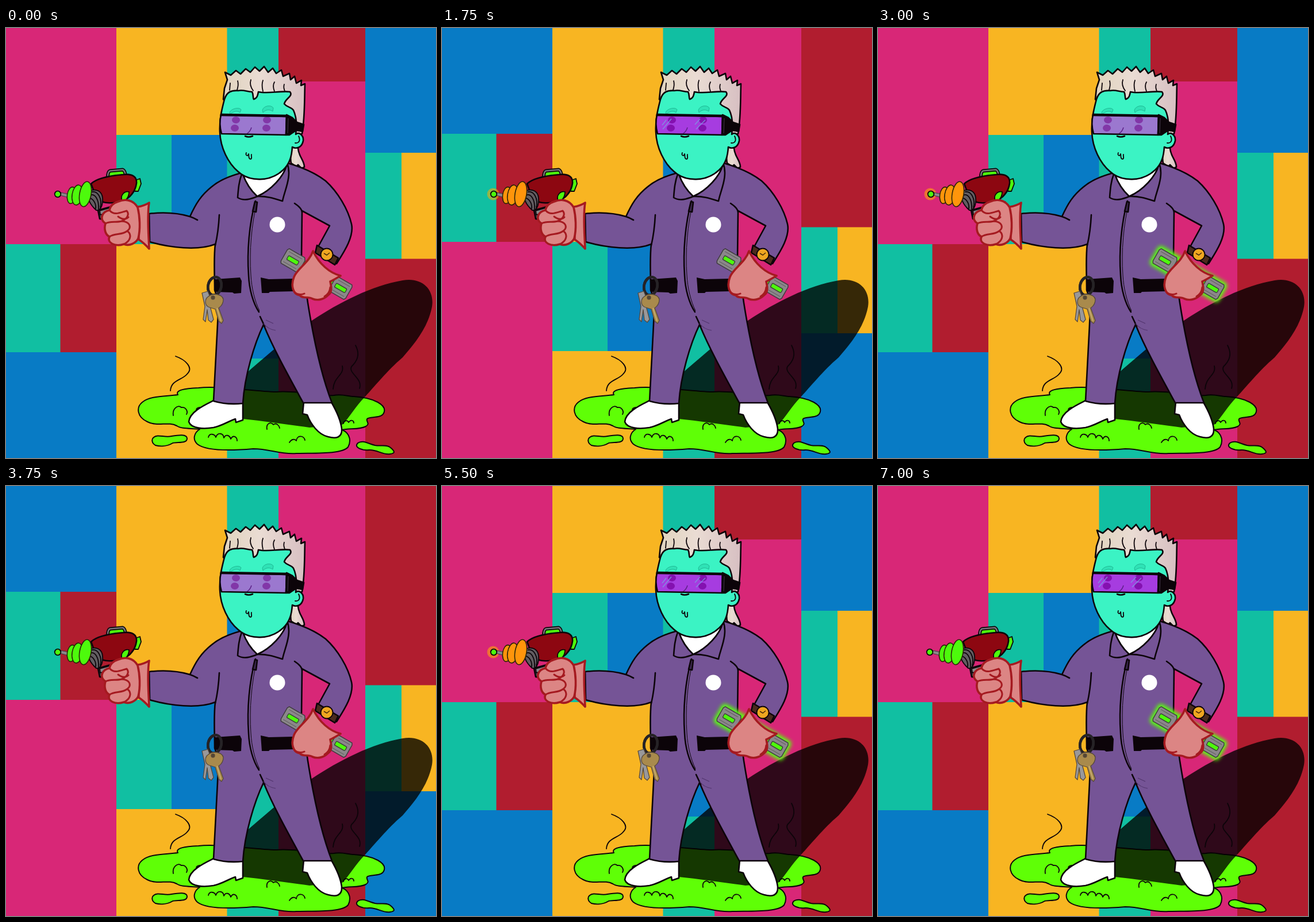
Animation, 748 px wide and 748 px high, one loop 7250 ms. Source, as an HTML page:

```html
<!DOCTYPE html>
<html lang="en">
<head>
<meta charset="utf-8">
<title>Space janitor</title>
<style>
html, body { margin: 0; width: 100%; height: 100%; overflow: hidden; }
svg { display: block; width: 100vw; height: 100vh; }
.ink { stroke: #0c0409; stroke-width: 2.6; stroke-linejoin: round; stroke-linecap: round; }
.line { fill: none; }
.thin { stroke-width: 1.8; }
.slime { fill: #5fff06; stroke-width: 2; }
.suit { fill: #755496; }
.skin { fill: #3bf3c4; }
.hair { fill: url(#hair); }
.glove { fill: #dc8584; stroke: #a51a20; stroke-width: 3.6; stroke-linejoin: round; stroke-linecap: round; }
.fold { fill: none; stroke-width: 3; }
.steel { fill: #8b878a; }
.lime { fill: #4dfa0c; }
</style>
</head>
<body>
<svg viewBox="0 0 748 748" xmlns="http://www.w3.org/2000/svg">
<defs>
  <linearGradient id="hair">
    <stop offset="0" stop-color="#e0d4be"/>
    <stop offset=".45" stop-color="#eadcd3"/>
    <stop offset="1" stop-color="#d7bfc2"/>
  </linearGradient>
  <filter id="blur" x="-30%" y="-60%" width="160%" height="220%"><feGaussianBlur stdDeviation="3"/></filter>
</defs>

<g id="tiles"></g>

<g id="puddle">
  <path class="ink slime" d="M299 638C294 630 310 627 335 626C370 622 430 632 470 633C510 630 540 641 570 639C585 636 595 641 605 641C640 643 664 656 657 670C652 680 632 675 628 680C626 685 634 688 626 693C615 699 596 696 585 699C600 706 600 720 595 729C584 742 535 739 505 740C475 742 460 732 430 732C395 735 350 737 333 724C324 716 327 704 337 698C322 696 306 698 297 692C282 684 264 694 246 685C228 677 226 660 237 651C250 640 275 641 299 638Z"/>
  <path class="ink slime" d="M257 712C264 706 276 713 288 710C300 708 315 706 315 714C315 723 300 720 290 722C280 728 268 728 260 726C253 722 253 715 257 712Z"/>
  <path class="ink slime" d="M612 722C620 716 630 723 642 726C652 728 662 724 669 730C676 736 678 740 668 741C655 743 645 733 632 734C620 735 604 730 612 722Z"/>
  <path class="ink line thin" d="M291 674C289 662 299 655 305 660C313 659 317 667 314 672M331 664C332 660 338 659 344 661M352 712C354 704 363 706 365 712C368 703 378 704 379 713C382 706 389 708 391 715C395 707 402 711 402 718M454 698C452 688 461 684 465 690C470 686 475 691 476 696M493 721C497 714 503 715 505 718C506 708 518 708 520 717M587 688C588 682 594 682 596 686C600 680 605 683 605 687"/>
</g>

<path id="shadow" fill="#000" opacity=".78" d="M412 680L414 604C455 568 492 536 532 509C580 477 637 448 690 439C724 433 746 455 741 485C734 522 709 551 690 573C663 596 640 625 625 641C608 658 598 677 585 690L528 695C490 690 452 684 412 680Z"/>

<path class="ink line thin" d="M295 571C312 577 327 591 315 602C306 613 287 612 286 631M608 552C617 569 610 580 601 589C595 601 621 609 615 627M585 588C589 604 570 606 569 628"/>

<g id="shoes" class="ink" fill="#fff">
  <path d="M361 648C345 656 319 668 318 685C322 697 344 698 361 695C376 692 387 684 399 680L400 686L412 682L412 652Z"/>
  <path d="M518 650L516 671L524 673C530 689 543 707 560 711C574 715 585 713 584 697C582 682 573 663 566 651Z"/>
</g>

<path class="ink hair" d="M493 199C499 210 493 223 496 235L505 241L508 238L514 244L519 242C519 230 509 224 508 209Z"/>

<g id="suit">
  <path class="ink suit" d="M410 252C390 257 370 266 358 276C339 291 330 306 320 328C300 322 275 320 249 323L250 372C284 382 334 388 364 376C361 400 363 428 363 456C371 476 369 493 368 515C366 560 363 605 361 649Q385 656 412 653C415 605 432 549 448 516C466 560 493 608 517 652L567 652C547 601 535 541 525 478L514 400L515 318L563 344L540 386L575 410C587 391 606 363 601 341C595 315 577 285 556 266C538 252 514 242 490 235Z"/>
  <path class="ink line" d="M371 325C370 345 368 361 364 378M515 320C514 314 508 309 502 305M320 328Q326 330 333 334M442 502L450 519"/>
  <path class="line" stroke="#53366f" stroke-width="1.2" d="M448 514C454 522 462 525 469 526M452 508L465 514"/>
  <path d="M364 437L407 434L410 440L409 461L397 462L394 460L363 459ZM443 434L457 437L500 436L501 458L459 459L457 461L445 461Z" fill="#0c0409"/>
  <path class="ink line" stroke-width="2" d="M434 301C423 340 419 389 422 430C423 455 430 479 440 494"/>
  <path class="line" stroke="#0c0409" d="M437 302C427 340 423 389 426 430C427 452 433 476 441 492"/>
  <path class="ink" fill="#fff" d="M411 252C416 267 425 282 437 293C460 283 485 258 489 235Z"/>
  <path class="ink suit" d="M411 252C405 266 404 281 403 295C414 302 427 297 437 293C425 282 416 267 411 252ZM489 235C485 258 460 283 437 293C454 292 468 297 481 301C484 284 498 258 489 235Z"/>
  <path class="ink" fill="#39264b" d="M433 302L429 319L435 320L437 303Z"/>
  <circle cx="472" cy="342" r="13.5" fill="#fff"/>
</g>

<g id="head">
  <path class="ink hair" d="M378 124L380 105L385 90L381 77L391 82L400 74L408 80L417 71L425 77L433 68L441 75L449 67L456 77L464 70L470 79L479 73L482 84L493 79L495 90L502 84L505 96L514 91L513 100L520 97C519 130 520 155 515 184L492 190L390 140Z"/>
  <path class="ink skin" d="M380 124C384 111 392 108 404 109C413 107 420 111 428 111C431 116 429 122 431 124C437 122 438 117 439 111C454 115 476 109 494 111C500 119 486 122 484 132C490 139 496 137 500 143C506 156 506 171 504 185C510 180 518 187 517 196C515 208 505 211 498 207C497 222 494 236 482 247C460 268 424 268 404 250C386 235 373 208 372 181C371 160 375 143 380 124Z"/>
  <path class="ink line thin" d="M403 92C405 99 403 104 402 108M426 90C423 99 427 105 430 109M447 91C444 99 446 106 447 110M467 94C463 101 466 107 467 110M484 98C482 103 484 107 485 110M390 96L389 108"/>
  <path fill="#2fe2b6" stroke="#1fb994" d="M389 147C391 140 406 137 409 142L407 147C402 143 396 145 390 150ZM446 143C448 135 461 133 465 139L464 145C458 141 452 142 447 147Z"/>
  <path class="ink line thin" d="M509 188C513 196 509 201 503 200M418 217C416 222 421 224 422 219C423 221 421 227 425 228C429 228 426 222 427 220"/>
  <g id="visor">
    <path id="lens" d="M374 151L488 154L487 185L375 184Q370 167 374 151Z"/>
    <g id="eyes">
      <ellipse cx="400" cy="160" rx="7" ry="6"/><ellipse cx="398" cy="174" rx="7" ry="6"/>
      <ellipse cx="454" cy="160" rx="7" ry="6"/><ellipse cx="453" cy="174" rx="7" ry="6"/>
    </g>
    <path class="line" stroke="#5c2187" stroke-width="1.5" d="M427 173Q425 180 419 184"/>
    <path id="glint" class="line" stroke="#7aa0e0" stroke-width="1.5" opacity=".8" d="M383 169L390 160M384 176L399 158M440 168L449 158M442 176L458 160"/>
    <path class="ink line" d="M374 151L488 154L487 186L375 184Q370 167 374 151ZM416 188Q422 191 429 188"/>
    <path class="ink" fill="#0c0409" d="M374 150L489 152L489 154L374 152ZM488 151L498 156L506 164L518 168L516 180L505 178L493 186L487 186Z"/>
    <path stroke="#443849" d="M491 157L490 183"/>
  </g>
</g>

<g id="keys" class="line" stroke-linejoin="round">
  <ellipse id="ring" cx="363" cy="449" rx="11.5" ry="16" transform="rotate(12 363 449)" stroke="#262326" stroke-width="4.5"/>
  <use href="#ring" style="stroke-width:2"/>
  <g stroke="#57493c" stroke-width="1.3">
    <path fill="#99989a" d="M341 461L351 458L357 473L355 484L361 507L357 512L352 508L350 490L347 511L343 507L346 484Z"/>
    <path fill="#a98a4c" d="M352 467C360 460 376 463 378 472C378 481 373 485 370 487L378 509L375 514L370 510L364 489L354 486C345 483 345 472 352 467Z"/>
    <circle cx="360" cy="469" r="3" fill="#554630"/>
    <path stroke="#d0b87c" d="M367 487L374 510"/>
  </g>
</g>

<g id="watch">
  <path class="ink" fill="#4a2b1d" d="M541 378L578 400L572 412L538 391Z"/>
  <circle class="ink thin" cx="558" cy="394" r="10.5" fill="#efa720"/>
  <path class="line" stroke="#4b2c0b" stroke-width="1.5" d="M553 392L558 395L563 391"/>
</g>

<g id="rod" transform="translate(541 428.5) rotate(30)">
  <rect id="glow" x="-69" y="-18" width="136" height="36" rx="5" fill="#59ff0b" stroke="#59ff0b" stroke-width="3" filter="url(#blur)"/>
  <rect class="lime" x="-40" y="-10" width="80" height="20" stroke="#2b5a14"/>
  <g id="caps" stroke="#3d3a3c" stroke-width="1.4" stroke-linejoin="round">
    <path class="steel" d="M-64 -14.5H-33L-30 -10V10L-33 14.5H-64L-66 11V-11ZM62 -14.5H34L31 -10V10L34 14.5H62L64 11V-11Z"/>
    <rect class="lime" x="-59" y="-4" width="21" height="8" rx="2"/>
    <rect class="lime" x="37" y="-4" width="21" height="8" rx="2"/>
    <path class="line" stroke-width="1" opacity=".6" d="M-62 -10H-36M-62 10H-36M60 -10H37M60 10H37"/>
  </g>
</g>
<path class="glove" d="M534 388C528 407 507 418 501 433C495 448 499 463 511 465C517 472 526 466 533 471C542 475 553 472 560 465C568 460 566 450 564 441C569 439 575 435 582 431C563 426 545 411 534 388Z"/>
<path class="glove fold" d="M502 460Q511 466 519 462M554 467Q563 462 564 451"/>

<g id="gun">
  <path class="ink" fill="#4c4649" d="M160 317L215 302L221 309L185 320L171 333L163 332Z"/>
  <path class="ink steel thin" d="M163 318L219 302L220 307L164 325Z"/>
  <path class="ink lime" d="M180 249L205 247L208 259L177 261Z"/>
  <path class="ink line" style="stroke-width:6" d="M177 259Q177 250 181 248.500L203 246.500Q207 248 208 257"/>
  <path class="line" stroke="#77757a" stroke-width="2.5" d="M177 259Q177 250 181 248.500L203 246.500Q207 248 208 257"/>
  <path class="ink lime thin" d="M225 265L233 262L235 271L230 284L224 284Z"/>
  <path class="ink" fill="#8d0711" d="M148 271C158 261 180 257 204 255C220 253 228 259 227 270C225 285 215 296 204 300C188 306 170 306 158 298Z"/>
  <path class="ink lime thin" d="M202 301C198 291 206 283 214 285Q214 295 207 300Z"/>
  <path class="ink thin" fill="#625d61" d="M144 284C157 278 167 284 168 296C169 308 164 319 157 317C148 309 140 298 144 284Z"/>
  <path class="ink line thin" d="M146 291C155 287 162 299 161 315M150 285C160 283 168 298 164 312M143 296C151 295 157 305 156 314"/>
  <circle id="halo" cx="89" cy="289" r="10.5" fill="#ffad00" opacity=".56"/>
  <path class="steel" stroke="#3d3a3c" d="M94 286L109 289V295L94 291Z"/>
  <g id="coils" class="ink" style="stroke:#2b2408;stroke-width:1.6">
    <ellipse cx="114" cy="291" rx="7.5" ry="14.500" transform="rotate(8 114 291)"/>
    <ellipse cx="124" cy="290.500" rx="9" ry="17.500" transform="rotate(9 124 290.500)"/>
    <ellipse cx="138" cy="289" rx="10" ry="22" transform="rotate(10 138 289)"/>
  </g>
  <circle class="ink lime thin" cx="90" cy="289" r="5.3"/>
</g>

<g id="fist">
  <path class="glove" d="M229 311Q239 310 249 304C245 327 248 358 249 384Q240 374 231 368Z"/>
  <path class="glove" d="M229 312C221 298 206 297 195 302C185 305 181 311 180 317C168 319 161 332 173 340C170 350 173 360 180 363C175 374 190 381 205 376C215 380 226 374 230 366C234 350 233 328 229 312Z"/>
  <path class="glove fold" d="M180 317C188 327 199 321 210 318C216 325 209 333 201 336C193 339 182 335 173 340M201 336C216 337 219 347 211 353C201 361 190 356 180 363M211 353C220 360 216 371 205 376M195 328C203 334 209 333 213 329"/>
</g>
</svg>

<script>
const STEP = 250, STEPS = 29;
const $ = id => document.getElementById(id);
const [pink, gold, teal, blue, red] = ['#d82777', '#f8b522', '#11bfa2', '#087bc5', '#b11d2f'];

// Each column: left, right, then tiles as [top, colour, optional right-half colour, split]
const columns = [
  [0, 192, [[0, pink], [376, teal, red, 94.5], [564, blue]]],
  [192, 384.5, [[0, gold], [186, teal, blue, 288], [376, gold]]],
  [384.5, 474, [[0, teal], [383, blue], [575, teal]]],
  [474, 625, [[0, red], [93, pink]]],
  [625, 748, [[0, blue], [217, teal, gold, 688], [401.5, red]]]
];

// Tiles overlap the next one by a pixel so that no seams show.
function tile(x, y, right, bottom, fill) {
  const r = document.createElementNS('http://www.w3.org/2000/svg', 'rect');
  const attrs = { x, y, width: right - x + 1, height: bottom - y + 1, fill };
  for (const k in attrs) r.setAttribute(k, attrs[k]);
  $('tiles').append(r);
}

for (const [left, right, rows] of columns) {
  rows.forEach(([top, fill, fill2, split], i) => {
    const bottom = i + 1 < rows.length ? rows[i + 1][0] : 748;
    tile(left, top, right, bottom, fill);
    if (fill2) tile(split, top, right, bottom, fill2);
  });
}

const lenses = [
  { lens: '#9b78cf', eyes: '#8237a8', glint: 0 },
  { lens: '#a63ce0', eyes: '#8411b0', glint: 1 },
  { lens: '#67409f', eyes: '#532080', glint: 1 }
];
const show = (id, on) => $(id).style.display = on ? '' : 'none';

function draw(n) {
  // The wall flips upside down on every step.
  $('tiles').setAttribute('transform', n % 2 ? 'translate(0 748) scale(1 -1)' : '');

  const look = lenses[n % 3];
  $('lens').setAttribute('fill', look.lens);
  $('eyes').setAttribute('fill', look.eyes);
  show('glint', look.glint);

  const pulse = n % 8;
  show('glow', pulse > 2 && pulse < 7);

  const shot = n % 13, hot = shot > 4;
  $('coils').setAttribute('fill', hot ? '#ff950b' : '#4dfa0c');
  show('halo', hot);
  $('gun').setAttribute('transform', hot && shot % 2 === 0 ? 'translate(2 0)' : '');
  $('coils').setAttribute('transform', hot ? 'translate(-1 0)' : '');
}

const start = performance.now();
let last = -1;
function tick(now) {
  const n = Math.floor(Math.max(0, now - start) / STEP) % STEPS;
  if (n !== last) draw(last = n);
  requestAnimationFrame(tick);
}
draw(0);
requestAnimationFrame(tick);
</script>
</body>
</html>
```
